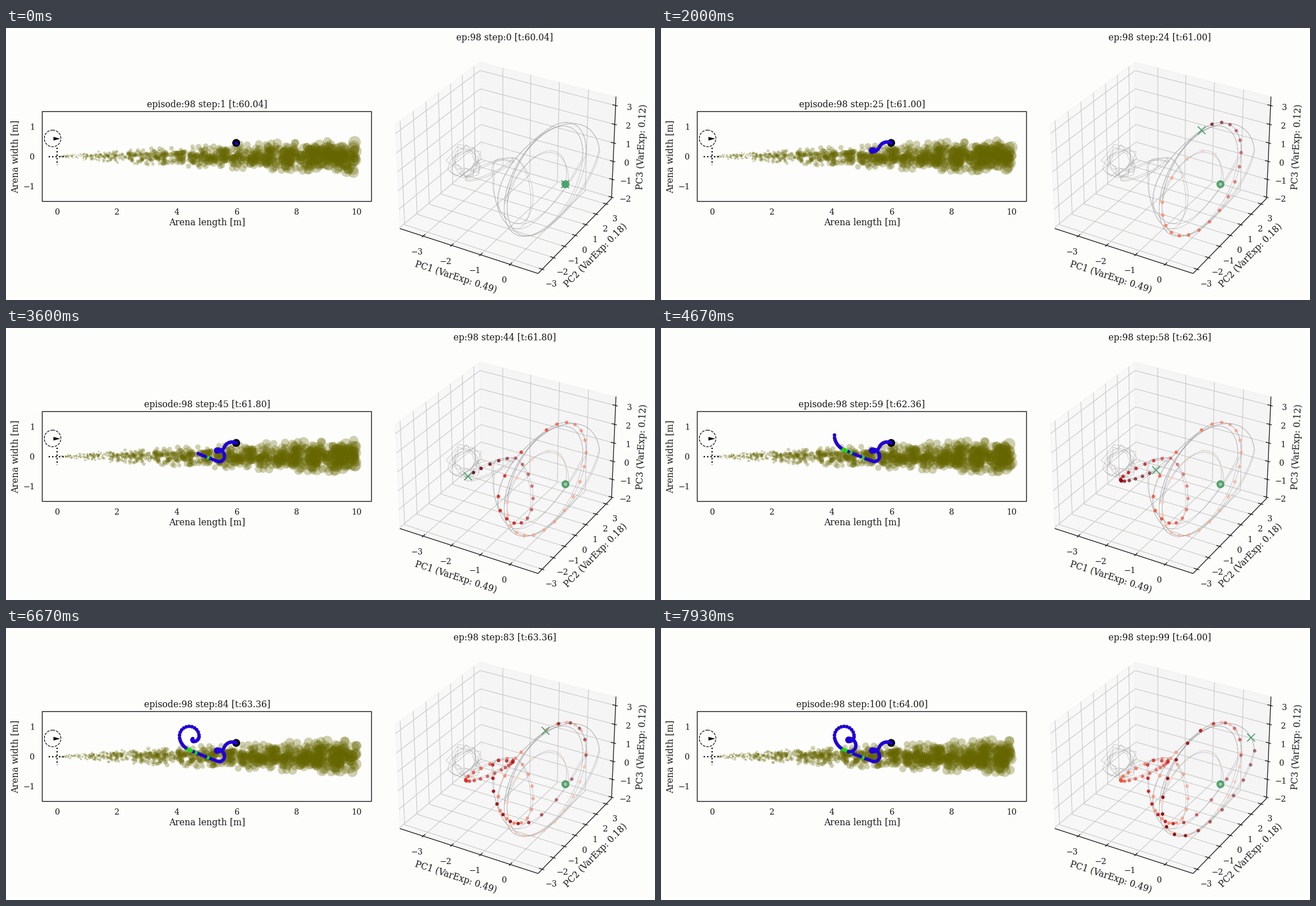
A matplotlib script for the animation above (8 s loop, 1156 by 484 pixels).

```python
import numpy as np
import matplotlib.pyplot as plt
from matplotlib.animation import FuncAnimation
from matplotlib.patches import Circle, Polygon, Rectangle

W, H, DPI = 1156, 484, 64
PT = 72 / DPI  # points per pixel
FRAMES, INTERVAL = 200, 40
STEPS, SHOTS = 100, 120  # the steps are spread over 120 even exposures
LABEL, TICK = 15.75, 14.4  # text heights in pixels
INK, GREEN = "#141414", "#4ca26c"

plt.rcParams["font.family"] = "DejaVu Serif"
fig = plt.figure(figsize=(W / DPI, H / DPI), dpi=DPI, facecolor="#fdfdfc")
ax = fig.add_axes([0, 0, 1, 1])
ax.set(xlim=(0, W), ylim=(H, 0))
ax.axis("off")
rng = np.random.default_rng(7)


def text(x, y, s, size=LABEL, **kw):
    kw = {"ha": "center", "va": "baseline", **kw}
    return ax.text(x, y, s, fontsize=size * PT, color=INK, **kw)


def tick_text(x, y, value, ha="center"):
    text(x, y + 0.365 * TICK, str(value).replace("-", "\u2212"), TICK, ha=ha)


def line(pts, width, color=INK, **kw):
    xs, ys = np.transpose(pts)
    ax.plot(xs, ys, color=color, lw=width * PT, **kw)


def area(radius):
    return (2 * radius * PT) ** 2


def dots(radius, **kw):
    return ax.scatter([], [], s=area(radius), linewidths=0, **kw)


def disc(xy, radius, color):
    ax.add_patch(Circle(xy, radius, color=color, lw=0, zorder=4))


# ---- arena -------------------------------------------------------------
SCALE = 53.32  # pixels per metre
OX, OY = 91.2, 228.6
WIND = 0.5 * 0.04  # metres per step

PUFFS = 1160
puff_x = rng.uniform(-2.1, 10, PUFFS)
puff_y = np.clip(rng.normal(0, 1, PUFFS), -2.3, 2.3)
puff_r = rng.uniform(0.8, 1.15, PUFFS)
puffs = dots(1, color="#666600", alpha=0.3, zorder=2)


def plume(k):
    x = puff_x + WIND * k
    on = (x > 0.08) & (x < 10)
    x = x[on]
    y = 3 * puff_y[on] * x**0.62
    puffs.set_offsets(np.column_stack([OX + SCALE * x, OY + y]))
    puffs.set_sizes(area((0.7 + 0.92 * x) * puff_r[on]))


ax.add_patch(Rectangle((OX - 0.5 * SCALE, OY - 1.5 * SCALE), 11 * SCALE, 3 * SCALE,
                       fill=False, lw=1.4 * PT, ec=INK, zorder=6, snap=False))
for v in range(0, 11, 2):
    tick_text(OX + SCALE * v, 327, v)
for v in (-1, 0, 1):
    tick_text(51.5, OY - SCALE * v, v, ha="right")
text(358, 351.3, "Arena length [m]")
text(21.5, OY, "Arena width [m]", rotation=90, rotation_mode="anchor")
arena_title = text(358, 140.7, "")

# wind vane and source cross
ax.add_patch(Circle((83, 196.5), 14.8, fill=False, ls="--", lw=1.2 * PT, zorder=4))
ax.add_patch(Polygon([(84.5, 193.8), (96.5, 197), (84.5, 200.2)],
                     color="black", lw=0, zorder=4))
for dx, dy in [(15.5, 0), (0, 15.5)]:
    line([(OX - dx, OY - dy), (OX + dx, OY + dy)], 2.3, "black", ls=":", zorder=4)

# flight as arcs: end step, heading in degrees, length in pixels
ARCS = np.array([
    (0, 207, 0), (9, 113, 25.4), (13, 180, 16), (21, 360, 8), (30, 450, 20.5),
    (36, 560, 17.5), (48, 564, 55.6), (57, 620, 27.4), (68.5, 810, 58),
    (75, 900, 15), (85, 1080, 9), (93, 1170, 20), (99, 1270, 19.6)])


def fly(start, sub=10):
    end, heading, length = ARCS.T
    t = np.arange((STEPS - 1) * sub + 1) / sub
    angle = np.radians(np.interp(t, end, heading))
    angle = (angle[1:] + angle[:-1]) / 2
    stride = np.diff(np.interp(t, end, np.cumsum(length)))
    move = stride[:, None] * np.column_stack([np.cos(angle), np.sin(angle)])
    return (start + np.vstack([(0, 0), np.cumsum(move, axis=0)]))[::sub]


flight = fly((410, 204.5))
smell = np.isin(np.arange(STEPS), [40, 45, 47, 48, 49])
flight_rgb = np.where(smell[:, None], (0.08, 0.88, 0.04), (0.12, 0, 0.84))
disc(flight[0], 7, "black")
track = dots(3.2, zorder=5)

# ---- state space -------------------------------------------------------
BOX = np.array([8, 8, 6]) / 7
E, A = np.radians([30, -60])
RIGHT = np.array([-np.sin(A), np.cos(A), 0])
UP = np.array([-np.sin(E) * np.cos(A), -np.sin(E) * np.sin(A), np.cos(E)])
EYE = np.array([np.cos(E) * np.cos(A), np.cos(E) * np.sin(A), np.sin(E)])


def project(*p):
    """Unit-cube point to stage pixels, in perspective."""
    q = (np.array(p) - 0.5) * BOX
    k = 2463 / (10 - q @ EYE)
    return 893.6 + k * (q @ RIGHT), 240.2 - k * (q @ UP)


def path3(*pts):
    return [project(*p) for p in pts]


PANES = [
    ("#f8f8f9", [(0, 0, 0), (0, 1, 0), (0, 1, 1), (0, 0, 1)]),
    ("#f5f5f6", [(0, 1, 0), (1, 1, 0), (1, 1, 1), (0, 1, 1)]),
    ("#f7f7f7", [(0, 0, 0), (1, 0, 0), (1, 1, 0), (0, 1, 0)])]
for color, corners in PANES:
    ax.add_patch(Polygon(path3(*corners), fc=color, ec="#f2f2f2", lw=PT, zorder=0))

# first tick, last tick, fraction at zero, fraction per unit, label offset
AXES = [(-3, 0, 0.806, 0.2106, (-10.5, 27.5)),
        (-3, 3, 0.4866, 0.1448, (16, 25.5)),
        (-2, 3, 0.3755, 0.181, (24.5, 2.3))]
GRID = [lambda s: path3((s, 0, 0), (s, 1, 0), (s, 1, 1)),
        lambda s: path3((1, s, 0), (0, s, 0), (0, s, 1)),
        lambda s: path3((0, 0, s), (0, 1, s), (1, 1, s))]
MARK = [lambda s: path3((s, -0.012, 0), (s, 0.02, 0)),
        lambda s: path3((1.012, s, 0), (0.98, s, 0)),
        lambda s: path3((1.012, 1, s), (0.98, 1, s))]
ANCHOR = [lambda s: project(s, 0, 0), lambda s: project(1, s, 0),
          lambda s: project(1, 1, s)]
for (lo, hi, zero, unit, (dx, dy)), grid, mark, anchor in zip(AXES, GRID, MARK, ANCHOR):
    for v in range(lo, hi + 1):
        s = zero + unit * v
        line(grid(s), 1.05, "#c4c4c2", zorder=1)
        line(mark(s), 1.3, zorder=3)
        x, y = anchor(s)
        tick_text(x + dx, y + dy, v)
line(path3((0, 0, 0), (1, 0, 0), (1, 1, 0), (1, 1, 1)), 1.3, zorder=3)

for x, y, s, angle in [(801, 443, "PC1 (VarExp: 0.49)", -18),
                       (1050.5, 405, "PC2 (VarExp: 0.18)", 45.4),
                       (1133, 211, "PC3 (VarExp: 0.12)", 87.5)]:
    text(x, y, s, va="center", rotation=angle, rotation_mode="anchor")
state_title = text(888.5, 21.7, "")

# rings: centre, vector to the top, vector to the side
RINGS = np.array([(962, 303, 17, -50, 30, 0),
                  (963, 269, 35, -101, 61, 0),
                  (903, 288, -8, -60, 35, 0),
                  (861, 253, -4, -8, 42, -18),
                  (970, 269, 45, -98, 75, 0)], float)
START, BIG, NEAR, NEST, FAR = range(5)
# the state circles on, passing from ring to ring: step, angle, ring
TOUR = np.array([
    (0, 60, START), (6, -114, BIG), (24, -390, BIG), (28, -488, NEAR),
    (38, -700, NEAR), (42, -735, NEST), (45, -800, NEST), (52, -820, NEST),
    (58, -925, NEST), (63, -985, NEST), (68, -1150, NEAR), (73, -1262, NEAR),
    (78, -1375, BIG), (92, -1645, BIG), (98, -1741, FAR), (108, -1920, BIG)])


def circle_on(t, rings):
    step, angle, ring = TOUR.T
    a = np.radians(np.interp(t, step, angle))
    cx, cy, tx, ty, sx, sy = [np.interp(t, step, col)
                              for col in rings[ring.astype(int)].T]
    return np.column_stack([cx + tx * np.cos(a) + sx * np.sin(a),
                            cy + ty * np.cos(a) + sy * np.sin(a)])


orbit = circle_on(np.arange(STEPS), RINGS)

# faint history: earlier rounds and the tangle around the nest
fine = np.linspace(0, 108, 900)
rounds = [circle_on(fine, RINGS),
          circle_on(fine, RINGS + rng.normal(0, 2.5, RINGS.shape))]
turn = np.linspace(0, 40, 70)
reach = rng.uniform(0.35, 1, (70, 1))
tangle = (819, 237) + reach * np.column_stack([36 * np.cos(turn), 33 * np.sin(turn)])
for c in rounds + [tangle]:
    line(c, 0.75, "#8c8c8c", alpha=0.55, zorder=3)

reds = plt.get_cmap("Reds")
climb = np.gradient(orbit[:, 1])
fade = 0.75 + 0.22 * np.tanh(np.roll(climb, 1) / 12)  # rising arcs lie further back
disc(orbit[0], 7, GREEN)
trail = dots(3.1, zorder=5)
head, = ax.plot([], [], "x", color=GREEN, ms=14 * PT, mew=1.8 * PT, zorder=6)


def update(i):
    shot = int((i + 0.675) * SHOTS / FRAMES)
    k = shot * (STEPS - 1) // (SHOTS - 1)
    clock = f"[t:{60.04 + 0.04 * k:.2f}]"
    arena_title.set_text(f"episode:98 step:{k + 1} {clock}")
    state_title.set_text(f"ep:98 step:{k} {clock}")

    plume(k)
    track.set_offsets(flight[:k + 1])
    track.set_facecolor(flight_rgb[:k + 1])

    colors = reds(0.1 + 0.9 * np.arange(k) / max(k - 1, 1))
    colors[:, 3] = fade[:k]
    trail.set_offsets(orbit[:k].reshape(-1, 2))
    trail.set_facecolor(colors)
    head.set_data([orbit[k, 0]], [orbit[k, 1]])
    return arena_title, state_title, puffs, track, trail, head


anim = FuncAnimation(fig, update, frames=FRAMES, interval=INTERVAL,
                     repeat=True, repeat_delay=0, blit=False)
plt.show()
```
